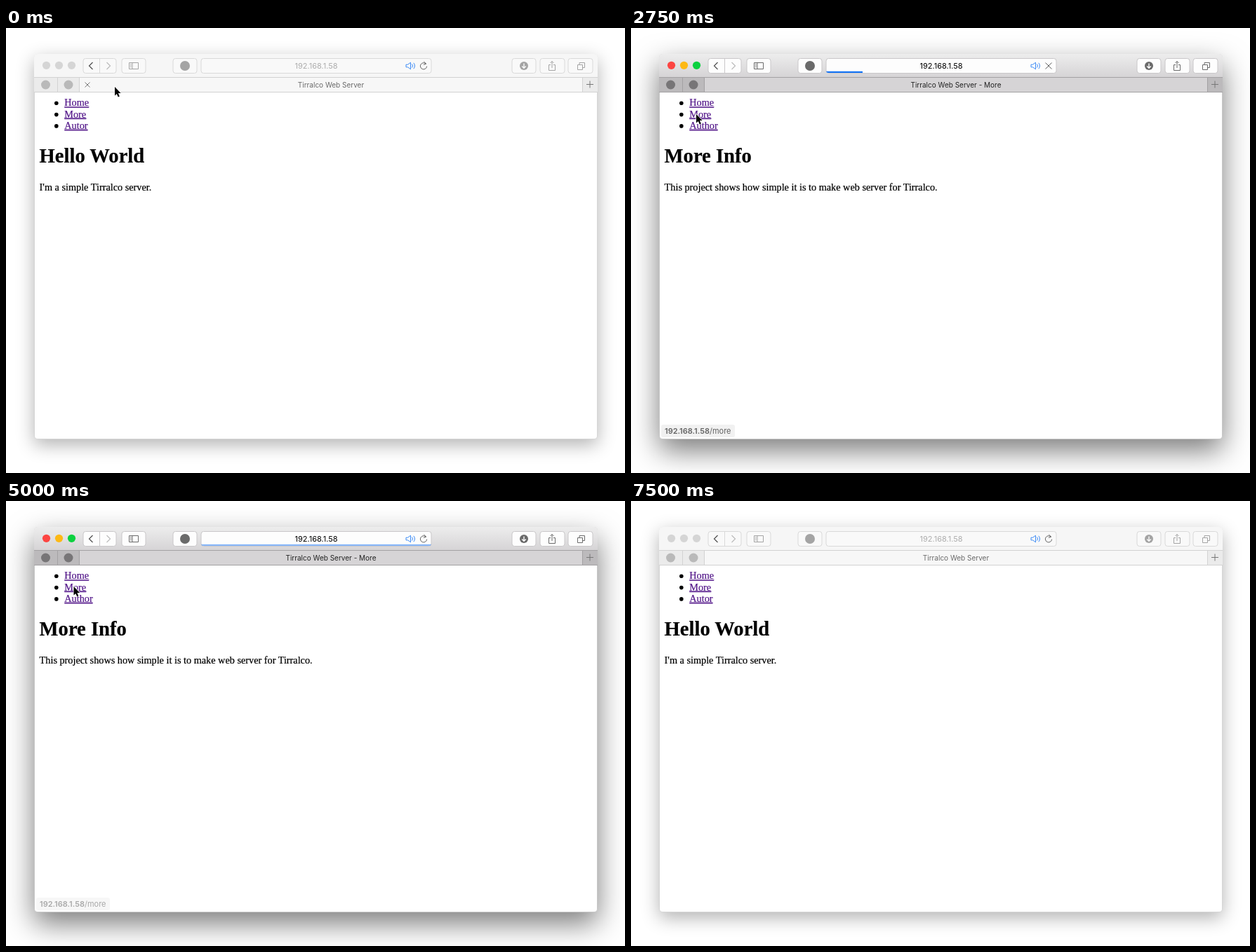
An HTML page that plays this animation: 882x635 px, repeating every 8000 ms.

```html
<!DOCTYPE html>
<html lang="en">
<head>
<meta charset="utf-8">
<title>Simple web server</title>
<style>
html, body { margin: 0; width: 100%; height: 100%; overflow: hidden; background: #fff; }
body {
  --top: #ededed; --low: #d5d3d5; --tab: #d6d4d6; --pin: #bcbabc; --line: #a3a1a3;
  --btn: #fdfdfd; --edge: #c9c7c9; --icon: #6a6a6a; --dot: #777577; --label: #222; --url: #444;
}
body.idle {
  --top: #f6f6f6; --low: #f6f6f6; --tab: #f7f7f7; --pin: #ebebeb; --line: #d2d2d2;
  --btn: #f9f9f9; --edge: #d9d9d9; --icon: #a4a4a4; --dot: #b9b9b9; --label: #6a6a6a; --url: #adadad;
}
body.loading { --url: #000; }
#win {
  position: absolute; left: 40px; top: 37px; width: 803px; height: 550px; border-radius: 5px;
  background: #fff; box-shadow: inset 0 0 0 1px rgba(0,0,0,.22), 0 16px 40px rgba(0,0,0,.52);
}
.idle #win { box-shadow: inset 0 0 0 1px rgba(0,0,0,.16), 0 8px 26px rgba(0,0,0,.3); }
svg { position: absolute; left: 0; top: 0; }
.ui, #status { font-family: Inter, Roboto, sans-serif; }
.page { font: 14.25px "Liberation Serif", Times, serif; }
.page text { stroke: #000; stroke-width: .22; }
.page .link { fill: #551a8b; stroke: #551a8b; text-decoration: underline; }
.btn { fill: var(--btn); stroke: var(--edge); }
.ico { fill: none; stroke: var(--icon); }
.idle .lights circle { fill: #d5d5d5; }
#status {
  position: absolute; left: 43px; top: 566px; height: 18px; padding: 0 5px; border-radius: 3px;
  background: #f1f1f1; color: #636363; font-size: 11px; line-height: 18.5px; white-space: nowrap;
}
#status b { font-weight: 600; }
</style>
</head>
<body>
<div id="win"></div>
<svg width="882" height="635" viewBox="0 0 882 635">
  <defs>
    <linearGradient id="bar" x2="0" y2="1">
      <stop style="stop-color:var(--top)"/><stop offset="1" style="stop-color:var(--low)"/>
    </linearGradient>
    <clipPath id="field"><rect x="278" y="44" width="328" height="20" rx="3.5"/></clipPath>
  </defs>

  <path d="M40 71V42q0-5 5-5H838q5 0 5 5V71z" fill="url(#bar)"/>
  <path d="M40 70H843V92H40z" style="fill:var(--tab)"/>
  <path d="M40 70H105V92H40zM821 70H843V92H821z" style="fill:var(--pin)"/>
  <path d="M40 70.5H843M40 91.5H843M73.5 70V92M104.5 70V92M821.5 70V92" style="stroke:var(--line)"/>

  <g class="lights">
    <circle cx="57.5" cy="53.3" r="5.6" fill="#fc4542"/>
    <circle cx="75.5" cy="53.3" r="5.6" fill="#fdb915"/>
    <circle cx="93.5" cy="53.3" r="5.6" fill="#0bd13f"/>
  </g>

  <g id="buttons"></g>
  <path d="M133.5 44V64" style="stroke:var(--edge)"/>
  <g fill="none" stroke-width="1.2">
    <path d="M123.5 49L118.5 54L123.5 59" stroke="#505050"/>
    <path d="M143.5 49L148.5 54L143.5 59" stroke="#bbb"/>
  </g>
  <path class="ico" d="M175.5 49.5H188.5V58.5H175.5zM180 49.5V58.5M177 51.7H178.7M177 53.7H178.7M177 55.7H178.7"/>
  <circle cx="255" cy="54" r="7" style="fill:var(--icon)"/>
  <circle cx="738" cy="54" r="6" style="fill:var(--icon)"/>
  <path d="M738 50.5V57M735.2 54.5L738 57.3L740.8 54.5" fill="none" style="stroke:var(--btn)" stroke-width="1.4"/>
  <path class="ico" d="M776 52.5H773.5V60.5H782.5V52.5H780M778 57V47.5M775.5 50L778 47.5L780.5 50"/>
  <path class="ico" d="M814.5 52.5H821.5V59.5H814.5zM817 52V49.5H824.5V56.5H822"/>

  <rect id="progress" x="278" y="61.8" height="3" fill="#1573f5" clip-path="url(#field)"/>
  <text class="ui" x="442" y="58" font-size="11" text-anchor="middle" style="fill:var(--url)">192.168.1.58</text>
  <path d="M570 52.2H572.5L576.5 49.2V58.8L572.5 55.8H570zM578.5 51.5q2 2.5 0 5M580.8 49.8q3.3 4.2 0 8.4" fill="none" stroke="#3b8af5"/>
  <g fill="none" stroke="#606060">
    <path id="reload" d="M598.4 51.2A4.6 4.6 0 1 0 599.6 54.6M595.4 48L598.6 51L595 52.4"/>
    <path id="stop" d="M590.5 49.5L599.5 58.5M599.5 49.5L590.5 58.5"/>
  </g>

  <g style="fill:var(--dot)"><circle cx="56.5" cy="81" r="6.5"/><circle cx="89" cy="81" r="6.5"/></g>
  <path id="close" d="M112.5 77.5L119.5 84.5M119.5 77.5L112.5 84.5" stroke="#777"/>
  <path d="M827 80.5H837M832 75.5V85.5" stroke="#777"/>
  <text class="ui" id="title" x="463" y="84.5" font-size="10" text-anchor="middle" style="fill:var(--label)"></text>

  <g class="page">
    <circle cx="71.8" cy="107.3" r="2.8"/><circle cx="71.8" cy="123.6" r="2.8"/><circle cx="71.8" cy="139.9" r="2.8"/>
    <text class="link" x="83.3" y="111.3">Home</text>
    <text class="link" x="83.3" y="127.6">More</text>
    <text class="link" id="third" x="83.3" y="143.9"></text>
    <text id="head" x="47.6" y="192" font-size="28.6" font-weight="bold"></text>
    <text x="47.6" y="231.7"><tspan id="copy"></tspan><tspan id="link" class="link"></tspan></text>
  </g>
</svg>
<div id="status"><b>192.168.1.58</b><span id="path"></span></div>
<svg width="882" height="635">
  <path id="cursor" d="M0 0V12.6L2.8 9.9L4.8 14.4L6.8 13.5L4.9 9H8.6z" stroke="#fff" stroke-width="1.2" paint-order="stroke"/>
</svg>
<script>
const $ = id => document.getElementById(id);
const show = (id, on) => { $(id).style.display = on ? "" : "none"; };

$("buttons").innerHTML = [[110, 47], [165, 34], [238, 34], [278, 328], [721, 34], [761, 35], [801, 35]]
  .map(([x, w]) => `<rect class="btn" x="${x}" y="43.5" width="${w}" height="21" rx="3.5"/>`).join("");

const site = "Tirralco Web Server";
const pages = {
  home: { title: site, third: "Autor", head: "Hello World", copy: "I'm a simple Tirralco server.", link: "" },
  more: { title: site + " - More", third: "Author", head: "More Info",
    copy: "This project shows how simple it is to make web server for Tirralco.", link: "" },
  author: { title: site + " - Autor", third: "Author", head: "Nolan Ostri", copy: "Follow Nolan on ", link: "Tiverlo" }
};

// Each step changes only the listed parts of the state.
// at: cursor tip, status: opacity, bar: progress width, glow: progress opacity
const steps = [
  { t: 0, page: "home", at: [155, 84], idle: true, hover: true, busy: false, status: 0, path: "", bar: 0, glow: 1 },
  { t: 250, at: [118, 97], hover: false },
  { t: 500, at: [99, 109.5] },
  { t: 1000, idle: false, status: 1 },
  { t: 1750, at: [94, 119], path: "/more" },
  { t: 2000, at: [93, 123] },
  { t: 2500, busy: true, bar: 33 },
  { t: 2750, page: "more", bar: 52 },
  { t: 3000, busy: false, bar: 328, glow: .5, status: .5 },
  { t: 3250, at: [94.5, 138], bar: 0, status: 1, path: "/author" },
  { t: 3500, busy: true, bar: 52, glow: 1 },
  { t: 3750, page: "author", bar: 328, status: .55 },
  { t: 4000, busy: false, bar: 0, status: 0 },
  { t: 4250, at: [96.5, 122], status: 1, path: "/more" },
  { t: 4500, busy: true, bar: 52 },
  { t: 4750, page: "more", bar: 328 },
  { t: 5000, busy: false, glow: .5, status: .55 },
  { t: 5250, bar: 0, status: 0 },
  { t: 5500, at: [98, 107], status: 1, path: "" },
  { t: 5750, busy: true, bar: 52, glow: 1 },
  { t: 6000, page: "home", bar: 328 },
  { t: 6250, busy: false, glow: .5, status: .55 },
  { t: 6500, bar: 0, status: 0 },
  { t: 6750, at: null },
  { t: 7250, idle: true }
];

function draw(t) {
  const s = Object.assign({}, ...steps.filter(step => step.t <= t));
  document.body.className = s.idle ? "idle" : s.bar ? "loading" : "";
  for (const [id, text] of Object.entries(pages[s.page])) $(id).textContent = text;
  $("path").textContent = s.path;
  $("status").style.opacity = s.status;
  $("progress").setAttribute("width", s.bar);
  $("progress").setAttribute("opacity", s.glow);
  show("stop", s.busy);
  show("reload", !s.busy);
  show("close", s.hover);
  show("cursor", s.at);
  if (s.at) $("cursor").setAttribute("transform", `translate(${s.at})`);
}

const start = performance.now();
function tick(now) {
  draw(Math.max(0, now - start) % 8000);
  requestAnimationFrame(tick);
}
draw(0);
requestAnimationFrame(tick);
</script>
</body>
</html>
```
